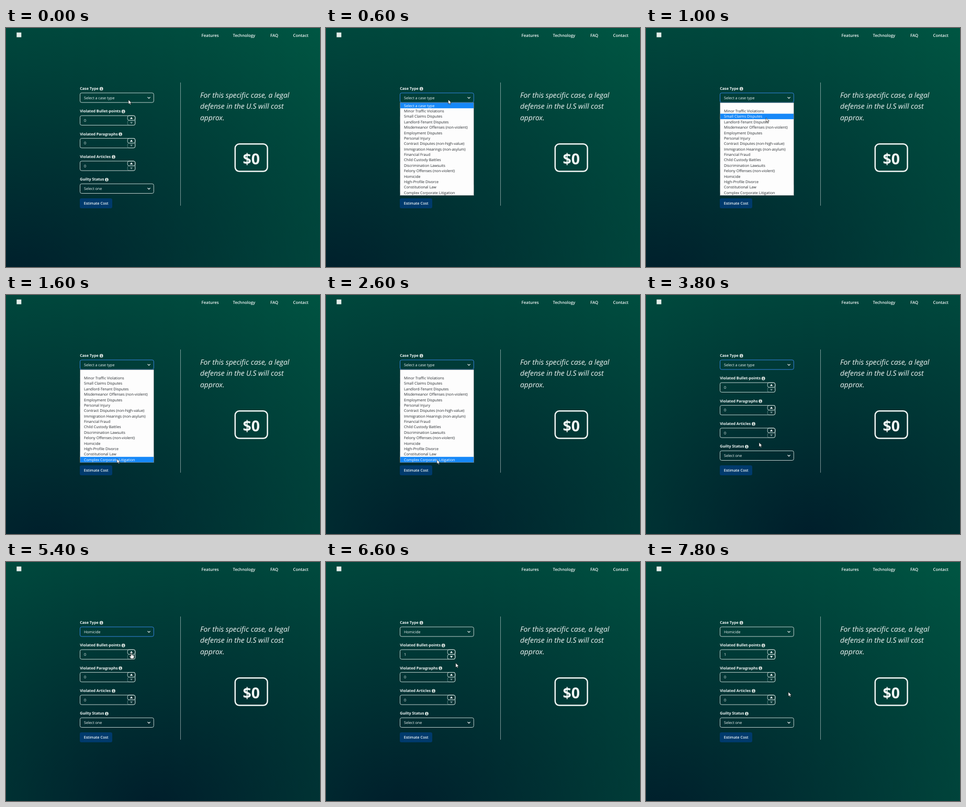
These frames come from a looping animation (600x456 px, 8000 ms). An HTML page:

```html
<!DOCTYPE html>
<html lang="en">
<head>
<meta charset="utf-8">
<title>Cost estimator</title>
<style>
  html, body { margin: 0; width: 100%; height: 100%; overflow: hidden; background: #013c38; }
  svg { display: block; width: 600px; height: 456px; }
  text { font: 7.15px "Open Sans", "Noto Sans", sans-serif; fill: #f4f8f7; text-rendering: geometricPrecision; }
  .nav { font-size: 7.9px; font-weight: 600; }
  .label { font-size: 7.2px; font-weight: 700; }
  .button { font-size: 7.1px; font-weight: 600; }
  .quote { font-size: 13.8px; font-style: italic; }
  .cost { font-size: 28.5px; font-weight: 700; text-anchor: middle; }
  .box { fill: none; stroke: #d3dfdc; stroke-width: .9; }
  .box.focus { stroke: #3b8df0; }
</style>
</head>
<body>
<svg id="stage" viewBox="0 0 600 456"></svg>
<script>
const LOOP = 8000, STEP = 200;
const stage = document.getElementById('stage');

function add(tag, attrs, content = '', parent = stage) {
  const node = document.createElementNS('http://www.w3.org/2000/svg', tag);
  for (const name in attrs) node.setAttribute(name, attrs[name]);
  node.textContent = content;
  return parent.appendChild(node);
}
const text = (x, y, content, style = '', parent) =>
  add('text', { x, y, class: style }, content, parent);
const box = (x, y, width, height, style = 'box') =>
  add('rect', { x, y, width, height, rx: 3, class: style });
const show = (node, visible) => node.setAttribute('visibility', visible ? 'visible' : 'hidden');

// Header
add('rect', { x: 20.3, y: 8.6, width: 9, height: 9, fill: '#e4eeea' });
[[373.6, 'Features'], [433.5, 'Technology'], [505, 'FAQ'], [548.4, 'Contact']]
  .forEach(([x, name]) => text(x, 16.5, name, 'nav'));

// Form
function label(row, name, iconX) {
  const y = 115.2 + row * 43.35;
  text(141.2, y + 2.6, name, 'label');
  add('circle', { cx: iconX, cy: y + .7, r: 3.4, fill: '#d5dfdc' });
  add('path', {
    d: `M${iconX - .9} ${y + .2}h1.1v2.3m-1.2 0h2.3M${iconX} ${y - 1.8}v1`,
    stroke: '#12443f', 'stroke-width': .9, fill: 'none'
  });
}
function select(row, value) {
  const y = 123.9 + row * 43.35;
  const frame = box(141.5, y, 140.8, 18.2);
  add('path', { d: `M270.6 ${y + 7.9}l2.5 2.5 2.5-2.5`, fill: 'none', stroke: '#fff', 'stroke-width': 1.1 });
  return { frame, value: text(149, y + 11.7, value) };
}
function stepper(row) {
  const y = 123.9 + row * 43.35;
  box(141.5, y, 105.3, 18.2);
  box(232.2, y, 14.6, 8.9);
  add('path', { d: `M237 ${y + 6.3}l2.6-3.9 2.6 3.9z`, fill: '#fff' });
  const down = add('g', {});
  down.append(
    box(232.2, y + 9.3, 14.6, 8.9),
    add('path', { d: `M237 ${y + 12}l2.6 3.7 2.6-3.7z`, fill: '#fff' }));
  return { down, value: text(149, y + 11.7, '0') };
}
label(0, 'Case Type', 182.2);
label(1, 'Violated Bullet-points', 224.2);
label(2, 'Violated Paragraphs', 218.6);
label(3, 'Violated Articles', 205.5);
label(4, 'Guilty Status', 192.4);
const caseType = select(0, 'Select a case type');
const steppers = [1, 2, 3].map(stepper);
select(4, 'Select one');
add('rect', { x: 141, y: 325, width: 62, height: 19, rx: 3, fill: '#003a6c' });
text(148.7, 337.2, 'Estimate Cost', 'button');

// Result
add('path', { d: 'M333.5 104V339', stroke: '#fff', 'stroke-opacity': .55, 'stroke-width': .9 });
['For this specific case, a legal', 'defense in the U.S will cost', 'approx.']
  .forEach((line, i) => text(371, 132.7 + i * 21.4, line, 'quote'));
add('rect', { x: 437.8, y: 221.2, width: 61.8, height: 52.4, rx: 8, fill: 'none', stroke: '#f1f6f4', 'stroke-width': 2.5 });
text(468.8, 259.7, '$0', 'cost');

// Drop-down list
const ROW = 10.375, LIST_TOP = 142.8;
const options = ['Select a case type', 'Minor Traffic Violations', 'Small Claims Disputes',
  'Landlord-Tenant Disputes', 'Misdemeanor Offenses (non-violent)', 'Employment Disputes',
  'Personal Injury', 'Contract Disputes (non-high-value)', 'Immigration Hearings (non-asylum)',
  'Financial Fraud', 'Child Custody Battles', 'Discrimination Lawsuits',
  'Felony Offenses (non-violent)', 'Homicide', 'High-Profile Divorce',
  'Constitutional Law', 'Complex Corporate Litigation'];
const list = add('g', {});
add('rect', { x: 141.5, y: 142.5, width: 141, height: 177, fill: '#fdfdfd', stroke: '#5f6f72', 'stroke-width': .8 }, '', list);
const highlight = add('rect', { x: 142, width: 140, height: ROW, fill: '#1688f8' }, '', list);
const rows = options.map((name, i) => text(149, 150.7 + i * ROW, name, '', list));

// Pointers, drawn with the hot spot at the origin
const arrow = add('path', {
  d: 'M0 0V8.3L1.9 6.6 3.2 9.3 4.6 8.7 3.4 6H6Z', fill: '#fff', stroke: '#111', 'stroke-width': .6
});
const hand = add('path', {
  d: 'M-.9 .8Q0-.7 .9 .8V4Q1.8 3.3 2.5 4.2 3.5 3.6 4.1 4.6 5.3 4.3 5.4 5.5V8Q5 9.2 4.5 10.8H-.9Q-1.3 9.2-3.3 6.7-3.3 5.3-2 5.7L-.9 6.8Z',
  fill: '#fff', stroke: '#111', 'stroke-width': .7
});

const path = [[0, 234, 137], [800, 233.6, 136.6], [1500, 212, 312.5], [2700, 212, 314],
  [3600, 216, 281.5], [4000, 216, 281.5], [5200, 239.3, 173.5], [6200, 239.3, 173.5],
  [7400, 272, 248], [LOOP, 272, 248]];
function pointerAt(t) {
  const i = path.findIndex(key => key[0] > t);
  const [t0, x0, y0] = path[i - 1], [t1, x1, y1] = path[i];
  const u = (t - t0) / (t1 - t0), k = u * u * (3 - 2 * u);
  return [x0 + (x1 - x0) * k, y0 + (y1 - y0) * k];
}

function draw(now) {
  const t = Math.floor(now % LOOP / STEP) * STEP;
  const sway = Math.cos((t - 4400) / LOOP * 2 * Math.PI);
  stage.style.background = `radial-gradient(1150px 874px at ${165 + 165 * sway}px ${475 - 15 * sway}px, #001e2b, #00684a)`;

  const [x, y] = pointerAt(t);
  const over = Math.max(0, Math.min(options.length - 1, Math.floor((y - LIST_TOP) / ROW)));
  show(list, t >= 400 && t < 3800);
  highlight.setAttribute('y', LIST_TOP + over * ROW);
  rows.forEach((row, i) => row.style.fill = i === over || i === 0 ? '#fff' : '#24282c');

  const stepped = t >= 5800;
  caseType.frame.classList.toggle('focus', t >= 400 && !stepped);
  caseType.value.textContent = options[t >= 4000 ? 13 : 0];
  steppers.forEach(({ down, value }, i) => {
    const count = i === 0 && stepped ? 1 : 0;
    value.textContent = count;
    down.setAttribute('opacity', count ? 1 : .45);
  });

  const onButton = x > 232 && x < 247 && y > 167 && y < 186 && t > 4000;
  show(arrow, !onButton);
  show(hand, onButton);
  for (const pointer of [arrow, hand]) pointer.setAttribute('transform', `translate(${x} ${y})`);
}

const start = performance.now();
function frame() {
  draw(performance.now() - start);
  requestAnimationFrame(frame);
}
frame();
</script>
</body>
</html>
```
